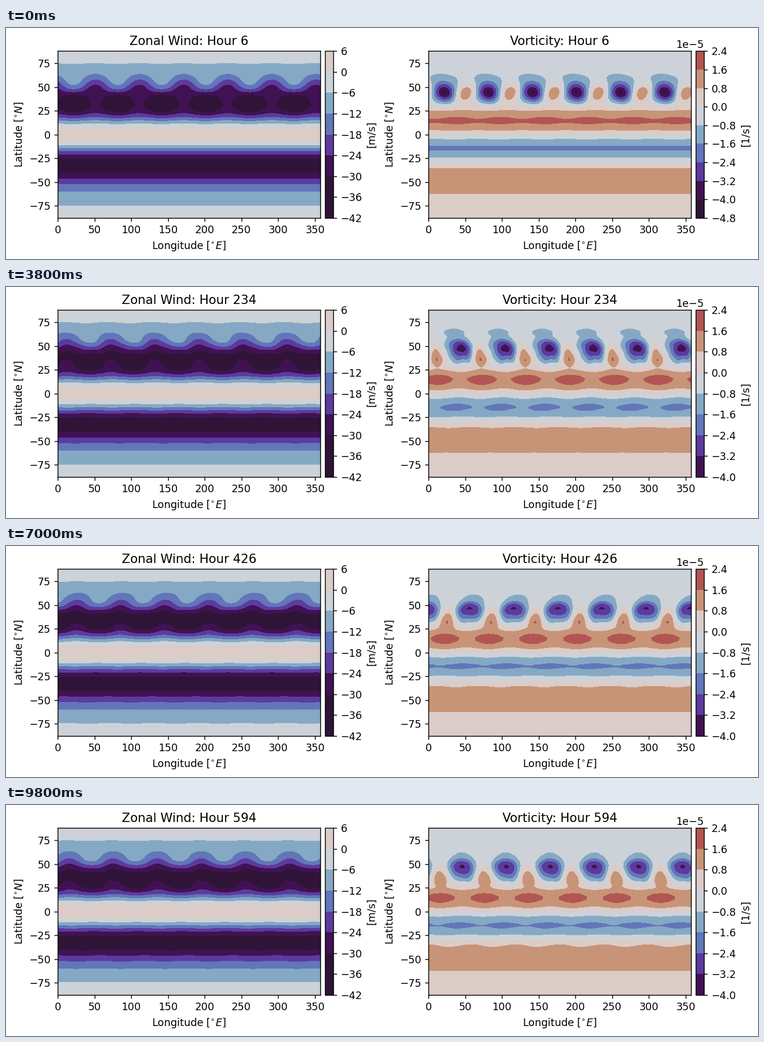
A matplotlib script for the animation above (10000 ms loop, 1280 px wide and 394 px high).

```python
"""Barotropic vorticity equation on a sphere: a wave-6 disturbance on easterly jets."""
import numpy as np
import matplotlib.pyplot as plt
from matplotlib.animation import FuncAnimation

RADIUS, OMEGA = 6.371e6, 7.292e-5
SYMMETRY, TRUNC, NLAT, NX, NLON = 6, 42, 64, 24, 128
HYPERDIFFUSION = 5e15
BUMP_LAT, BUMP_WIDTH, BUMP_VORTICITY = 45, 10, 4e-5
DT, FRAMES, FIRST_HOUR, HOURS_PER_FRAME = 1800.0, 50, 6, 12

waves = np.arange(0, TRUNC + 1, SYMMETRY)
mu, weights = np.polynomial.legendre.leggauss(NLAT)
lat, cos_lat = np.arcsin(mu), np.sqrt(1 - mu**2)
lon = np.arange(NLON) * 360 / NLON


def legendre_basis():
    """Normalised P[m, n, lat] and H = (1 - mu^2) dP/dmu."""
    p = np.zeros((len(waves), TRUNC + 2, NLAT))
    h = np.zeros_like(p)
    for j, m in enumerate(waves):
        def eps(n):
            return np.sqrt((n * n - m * m) / (4 * n * n - 1))

        k = np.arange(1, m + 1)
        p[j, m] = np.sqrt(0.5 * np.prod((2 * k + 1) / (2 * k))) * cos_lat**m
        for n in range(m + 1, TRUNC + 2):
            p[j, n] = mu * p[j, n - 1] / eps(n)
            if n > m + 1:
                p[j, n] -= eps(n - 1) / eps(n) * p[j, n - 2]
        for n in range(m, TRUNC + 1):
            h[j, n] = -n * eps(n + 1) * p[j, n + 1]
            if n > m:
                h[j, n] += (n + 1) * eps(n) * p[j, n - 1]
    return p[:, :-1].astype(complex), h[:, :-1].astype(complex)


P, H = legendre_basis()
degree = np.arange(TRUNC + 1)
laplacian = degree * (degree + 1) / RADIUS**2
inv_laplacian = np.zeros(TRUNC + 1)
inv_laplacian[1:] = -1 / laplacian[1:]
damping = np.exp(-HYPERDIFFUSION * laplacian**2 * DT)
im = 1j * waves[:, None]

U_BASIS, V_BASIS = -H / RADIUS, P / RADIUS
flux_weight = weights / (RADIUS * cos_lat**2)
P_FLUX = np.ascontiguousarray((P * flux_weight).transpose(0, 2, 1))
H_FLUX = np.ascontiguousarray((H * flux_weight).transpose(0, 2, 1))
P_ANALYSIS = np.ascontiguousarray((P * weights).transpose(0, 2, 1))
coriolis = 2 * OMEGA * mu


def apply(coeffs, basis):
    return (coeffs[:, None, :] @ basis)[:, 0]


def to_grid(spec, basis):
    return np.fft.irfft(apply(spec, basis), n=NX, axis=0) * NX


def fourier(grid):
    return np.fft.rfft(grid, axis=0)[:len(waves)] / NX


def tendency(zeta):
    psi = zeta * inv_laplacian
    u = to_grid(psi, U_BASIS)
    v = to_grid(im * psi, V_BASIS)
    q = to_grid(zeta, P) + coriolis
    return apply(-im * fourier(u * q), P_FLUX) + apply(fourier(v * q), H_FLUX)


def step(zeta):
    k1 = tendency(zeta)
    k2 = tendency(zeta + DT / 2 * k1)
    k3 = tendency(zeta + DT / 2 * k2)
    k4 = tendency(zeta + DT * k3)
    return (zeta + DT / 6 * (k1 + 2 * k2 + 2 * k3 + k4)) * damping


def initial_vorticity():
    c, s = cos_lat, mu
    slope = -50 * c * s + 120 * c**3 * s + 300 * (2 * s * c**8 - 7 * s**3 * c**6)
    zonal = slope / (RADIUS * c)
    offset = (np.degrees(lat) - BUMP_LAT) / BUMP_WIDTH
    bump = BUMP_VORTICITY * c * np.exp(-offset**2)
    phase = 2 * np.pi * np.arange(NX) / NX
    return apply(fourier(zonal + np.cos(phase)[:, None] * bump), P_ANALYSIS)


def to_map(spec, basis):
    harmonics = np.exp(1j * np.outer(waves, np.radians(lon)))
    harmonics[1:] *= 2
    return (apply(spec, basis).T @ harmonics).real


def simulate():
    zeta, maps = initial_vorticity(), []
    for i in range(FRAMES):
        hours = HOURS_PER_FRAME if i else FIRST_HOUR
        for _ in range(round(hours * 3600 / DT)):
            zeta = step(zeta)
        wind = to_map(zeta * inv_laplacian, U_BASIS) / cos_lat[:, None]
        maps.append((wind, to_map(zeta, P)))
    return maps


WIDTH, HEIGHT, DPI = 1280, 394, 128
plt.rcParams.update({"font.family": "DejaVu Sans", "font.size": 9.88})
fig = plt.figure(figsize=(WIDTH / DPI, HEIGHT / DPI), dpi=DPI)
maps = simulate()


def add_axes(left, width, top=39.4, bottom=323.8):
    return fig.add_axes([left / WIDTH, 1 - bottom / HEIGHT,
                         width / WIDTH, (bottom - top) / HEIGHT])


def draw_panel(left, field, limit, title, unit):
    ax = add_axes(left, 446.6)
    filled = ax.contourf(lon, np.degrees(lat), field, cmap="twilight_shifted",
                         vmin=-limit, vmax=limit)
    ax.set_title(title)
    ax.set_xlabel(r"Longitude [$^{\circ}E$]")
    ax.set_ylabel(r"Latitude [$^{\circ}N$]")
    bar = fig.colorbar(filled, cax=add_axes(left + 454.6, 14.2))
    bar.set_label(unit)
    bar.ax.yaxis.set_offset_position("right")


def draw(i):
    fig.clear()
    hour = FIRST_HOUR + HOURS_PER_FRAME * i
    wind, vorticity = maps[i]
    draw_panel(88.2, wind, 30, f"Zonal Wind: Hour {hour}", "[m/s]")
    draw_panel(719.2, vorticity, 4e-5, f"Vorticity: Hour {hour}", "[1/s]")


anim = FuncAnimation(fig, draw, frames=FRAMES, interval=200, repeat=True,
                     init_func=lambda: None)
plt.show()
```
